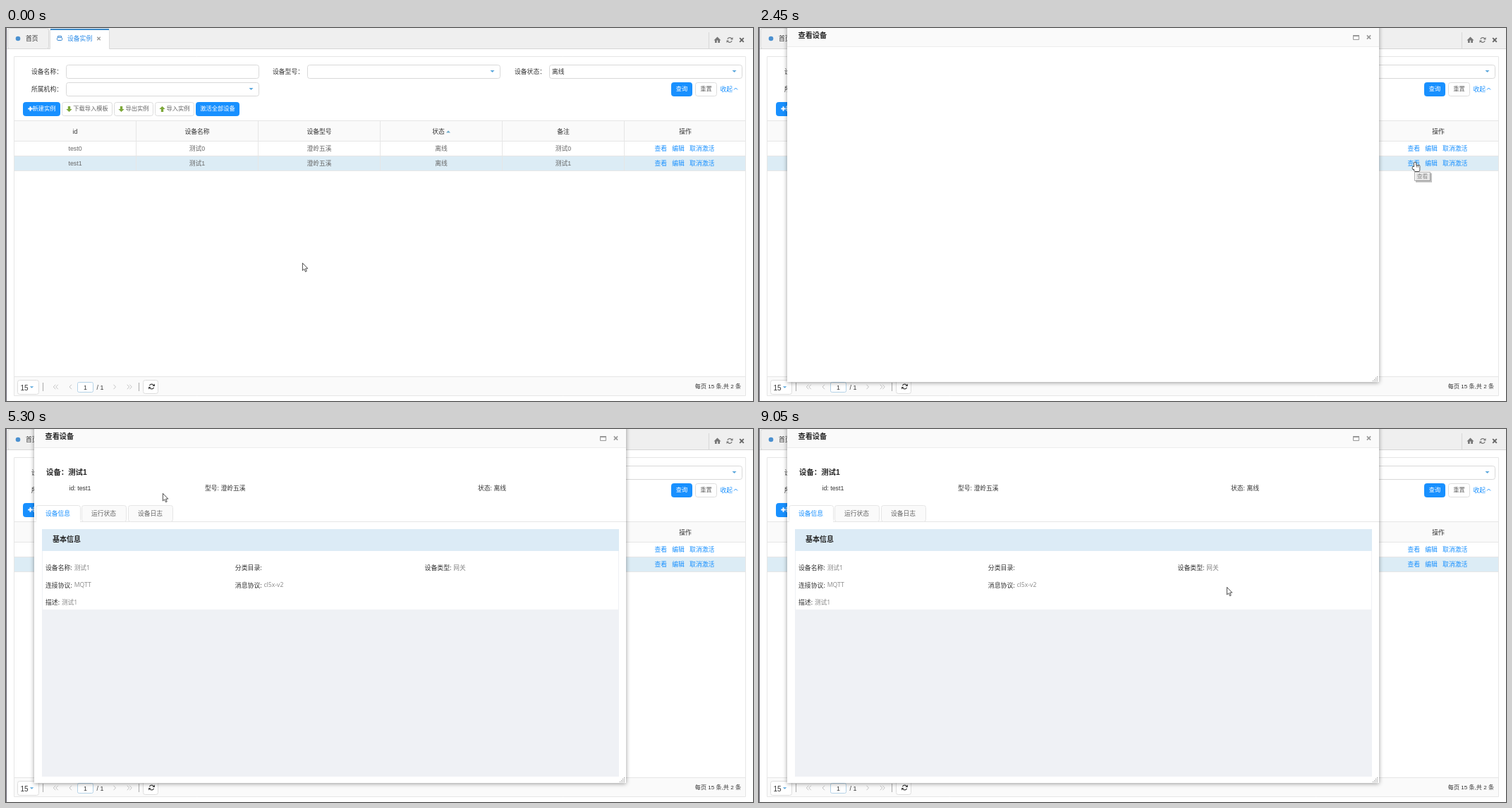
Recreate the animation shown at these times as an HTML page with a canvas. Size 1059 by 529 pixels, loop 9.1 s.

```html
<!DOCTYPE html>
<html lang="zh-CN">
<head>
<meta charset="utf-8">
<title>设备实例</title>
<style>
html, body { margin: 0; width: 100%; height: 100%; overflow: hidden; background: #fff; }
canvas { display: block; width: 1059px; height: 529px; }
</style>
</head>
<body>
<canvas id="stage" width="1059" height="529"></canvas>
<script>
const ctx = document.getElementById('stage').getContext('2d');
const LOOP = 9100, STEP = 50;
const BLUE = '#1890ff', LINE = '#e6e6e6', GREY = '#666', DARK = '#333', CARET = '#5aa7dc';
const UI = '"Liberation Sans", "Noto Sans CJK SC", sans-serif';
const CENTERED_COLON = '"Liberation Sans", "Noto Sans CJK TC", sans-serif';
const VALUE = '"Open Sans", "Noto Sans CJK SC", sans-serif';
const MODEL = '澄岭五溪';

// ---- drawing helpers ----
function text(s, x, y, { color = DARK, size = 8.8, align = 'left', bold = false, family = UI } = {}) {
  ctx.font = `${bold ? 'bold ' : ''}${size}px ${family}`;
  ctx.textAlign = align;
  ctx.fillStyle = color;
  ctx.fillText(s, x, y + size * 0.36);
  return ctx.measureText(s).width;
}
function rect(x, y, w, h, color) {
  ctx.fillStyle = color;
  ctx.fillRect(x, y, w, h);
}
function box(x, y, w, h, fill, border, radius = 3) {
  ctx.beginPath();
  ctx.roundRect(x + 0.5, y + 0.5, w - 1, h - 1, radius);
  if (fill) { ctx.fillStyle = fill; ctx.fill(); }
  if (border) { ctx.strokeStyle = border; ctx.lineWidth = 1; ctx.stroke(); }
}
function trace(points, x, y) {
  ctx.beginPath();
  points.forEach(([px, py]) => ctx.lineTo(x + px, y + py));
}
function shape(points, x, y, fill) {
  trace(points, x, y);
  ctx.fillStyle = fill;
  ctx.fill();
}
function line(points, x, y, color, width = 1) {
  trace(points, x, y);
  ctx.strokeStyle = color;
  ctx.lineWidth = width;
  ctx.stroke();
}
// Triangle pointing down for dir 1, up for dir -1.
function caret(x, y, color = CARET, dir = 1, r = 3) {
  shape([[-r, -r / 2 * dir], [r, -r / 2 * dir], [0, r / 2 * dir]], x, y, color);
}
function cross(x, y, r, color, width) {
  line([[-r, -r], [r, r]], x, y, color, width);
  line([[r, -r], [-r, r]], x, y, color, width);
}
function refresh(x, y, color) {
  for (const dir of [1, -1]) {
    const turn = dir > 0 ? 0 : Math.PI;
    ctx.beginPath();
    ctx.arc(x, y, 3.3, turn + 0.35, turn + 2.7);
    ctx.strokeStyle = color;
    ctx.lineWidth = 1.3;
    ctx.stroke();
    shape([[4.5, -4], [4.5, -0.5], [1, -0.5]].map(p => p.map(v => v * dir)), x, y, color);
  }
}
function chevrons(x, dir, count) {
  for (let i = 0; i < count; i++) {
    const dx = (i - (count - 1) / 2) * 3.5;
    line([[-1.5 * dir, -3.2], [1.5 * dir, 0], [-1.5 * dir, 3.2]], x + dx, 509, '#c4c4c4');
  }
}
function transferArrow(x, y, dir) {
  rect(x - 1.7, y - 2 - 2 * dir, 3.4, 4, '#7da83a');
  caret(x, y + 2 * dir, '#7da83a', dir, 4.2);
}
function plus(x, y) {
  rect(x - 3.2, y - 1, 6.4, 2, '#fff');
  rect(x - 1, y - 3.2, 2, 6.4, '#fff');
}
function button(label, x, y, w, primary, iconSpace = 0) {
  box(x, y, w, 20, primary ? BLUE : '#fff', primary ? BLUE : '#ddd');
  text(label, x + (w + iconSpace) / 2, y + 9.5, { size: 8.25, color: primary ? '#fff' : GREY, align: 'center' });
}

// ---- page ----
function tabBar() {
  rect(0, 0, 1059, 30, '#efefef');
  rect(0, 29, 1059, 1, '#d6d6d6');
  box(2, 0, 59, 30, '#f0f0f0', '#d8d8d8');
  ctx.beginPath();
  ctx.arc(17, 15, 3.3, 0, 7);
  ctx.fillStyle = '#4a90d0';
  ctx.fill();
  text('首页', 28, 15);
  box(62, 1, 85, 32, '#fff', '#ddd');
  rect(62, 30, 85, 4, '#fff');
  rect(63, 1, 83, 2, '#3a87c4');
  box(73, 11, 6, 4, null, '#3a87d0', 0);
  box(72, 13, 8, 5, '#fff', '#3a87d0', 1);
  text('设备实例', 87, 15, { color: '#2a8be8' });
  cross(131.5, 15, 2.2, '#999', 1.3);
  rect(996, 6, 1, 23, '#d8d8d8');
  caret(1008.5, 15, '#777', -1, 5);
  rect(1005, 17, 2.7, 4, '#777');
  rect(1009.3, 17, 2.7, 4, '#777');
  refresh(1026, 17, '#777');
  cross(1043, 17, 2.8, '#666', 1.9);
}
function searchForm() {
  ['设备名称：', '设备型号：', '设备状态：', '所属机构：'].forEach((label, i) => {
    const x = Math.floor(85 + 342.5 * (i % 3)), y = i < 3 ? 52 : 77;
    text(label, x - 49, y + 9.5, { family: CENTERED_COLON });
    box(x, y, 274, 20, '#fff', '#d9d9d9');
    if (i) caret(x + 262.5, y + 9.5);
  });
  text('离线', 774, 61.5);
  button('查询', 943, 77, 30, true);
  button('重置', 977, 77, 31, false);
  text('收起', 1012.5, 86.5, { color: BLUE });
  line([[-2.5, 1.5], [0, -1], [2.5, 1.5]], 1034.5, 86, BLUE);
}
function toolbar() {
  const down = x => transferArrow(x, 115, 1), up = x => transferArrow(x, 115, -1);
  const items = [['新建实例', x => plus(x, 114.5), true], ['下载导入模板', down], ['导出实例', down],
    ['导入实例', up], ['激活全部设备', null, true]];
  let x = 24;
  for (const [label, icon, primary] of items) {
    const iconSpace = !icon ? 0 : primary ? 7 : 10;
    const w = Math.round(label.length * 8.25 + iconSpace + 12.5);
    button(label, x, 105, w, primary, iconSpace);
    if (icon) icon(x + 10.5);
    x += w + 2;
  }
}
function table() {
  const center = column => 98 + 173 * column;
  rect(11, 132, 1038, 29, '#fafafa');
  rect(11, 181, 1038, 21, '#dcecf5');
  for (const y of [131, 160, 181, 202]) rect(11, y, 1038, 1, LINE);
  for (let i = 1; i < 6; i++) rect(11 + 173 * i, 132, 1, 70, LINE);
  ['id', '设备名称', '设备型号', '状态', '备注', '操作'].forEach((s, i) =>
    text(s, center(i) - (s === '状态' ? 4 : 0), 146.5, { align: 'center' }));
  caret(627, 147, '#6aa9c9', -1);
  for (const row of [0, 1]) {
    const y = 171.3 + row * 20.5;
    ['test' + row, '测试' + row, MODEL, '离线', '测试' + row].forEach((s, i) =>
      text(s, center(i), y, { align: 'center', color: GREY }));
    ['查看', '编辑', '取消激活'].forEach((s, i) => text(s, 919.5 + 24.8 * i, y, { color: BLUE }));
  }
}
function pager() {
  rect(11, 494, 1038, 28, '#fafafa');
  rect(11, 494, 1038, 1, LINE);
  box(16, 499, 31, 21, '#fff', '#ddd');
  text('15', 20.5, 510, { size: 10 });
  caret(36.5, 509.5, CARET, 1, 2.7);
  for (const x of [52, 188]) rect(x, 503, 1, 12, '#aaa');
  chevrons(70.5, -1, 2);
  chevrons(91.5, -1, 1);
  box(101, 502, 23, 15, '#fff', '#b5d3e8', 2);
  text('1', 112.5, 509.5, { align: 'center' });
  text('/ 1', 128.5, 509.5);
  chevrons(154, 1, 1);
  chevrons(175, 1, 2);
  box(194, 499, 22, 20, '#fff', '#ddd');
  refresh(206.5, 508.5, '#444');
  text('每页 15 条,共 2 条', 1042, 508, { size: 8.1, align: 'right' });
}
function page() {
  rect(0, 0, 1059, 529, '#fff');
  tabBar();
  searchForm();
  toolbar();
  table();
  pager();
  box(11, 40, 1038, 482, null, LINE, 0);
  rect(0, 0, 1, 529, '#6b6875');
}

// ---- dialog ----
function dialogFrame() {
  ctx.save();
  ctx.shadowColor = 'rgba(0,0,0,.4)';
  ctx.shadowBlur = 6;
  ctx.shadowOffsetY = 1;
  rect(40, -20, 839, 522, '#fff');
  ctx.restore();
  rect(40, 0, 839, 26, '#fafafa');
  rect(40, 26, 839, 1, '#ececec');
  text('查看设备', 55.5, 10.5, { size: 10.2, bold: true, color: '#222' });
  box(842, 10, 9, 7, null, '#999', 0);
  rect(842, 10, 9, 2, '#999');
  cross(864.5, 13, 2.6, '#999', 1.6);
  for (let i = 0; i < 4; i++)
    for (let j = 0; j <= i; j++) rect(876 - j * 2, 494 + i * 2, 1, 1, '#888');
}
function dialogContent(loaded) {
  text('设备：测试1', 57, 61, { size: 10.4, bold: true, color: '#222', family: CENTERED_COLON });
  text('id: test1', 89.5, 84);
  text('型号: ' + MODEL, 282, 84);
  text('状态: 离线', 669, 84);
  rect(40, 131, 839, 1, LINE);
  ['设备信息', '运行状态', '设备日志'].forEach((s, i) => {
    const x = Math.floor(42 + i * 65.5), active = i === 0;
    box(x, 108, 64, 24, active ? '#fff' : '#fafafa', LINE);
    if (active) rect(x + 1, 129, 62, 3, '#fff');
    text(s, x + 31.5, 120, { align: 'center', color: active ? BLUE : GREY });
  });
  rect(51, 142, 818, 351, '#eff1f5');
  rect(51, 142, 818, 31, '#dcebf6');
  rect(52, 173, 816, 83, '#fff');
  text('基本信息', 66, 156.5, { size: 10, bold: true, color: '#222' });
  const rows = [
    [['设备名称:', '测试1'], ['分类目录:', ''], ['设备类型:', '网关']],
    [['连接协议:', 'MQTT'], ['消息协议:', 'cl5x-v2']],
    [['描述:', '测试1']],
  ];
  rows.forEach((row, r) => row.forEach(([label, value], c) => {
    const x = 56 + 268.8 * c, y = 197 + 24.3 * r;
    const w = text(label, x, y, { size: 8.9, family: VALUE });
    if (loaded) text(value, x + w + 2.8, y, { size: 8.7, color: '#888', family: VALUE });
  }));
}

// ---- pointer ----
const REST = [420, 333];
// Each move: start, end, destination x, y; the pointer rests in between.
const MOVES = [
  [150, 1100, 952, 188], [1550, 2050, 930, 190], [3400, 3750, 363, 180], [3900, 4850, 85, 86],
  [5150, 5300, 222, 91], [5300, 6000, 728, 86], [6200, 6650, 145, 147], [6650, 6900, 135, 186],
  [7100, 7600, 66, 164], [7750, 8000, 110, 215], [8100, 8400, 136, 243], [8500, 8700, 325, 233],
  [8800, 9050, 663, 224],
];
const ramp = (t, from, to) => Math.min(1, Math.max(0, (t - from) / (to - from)));
const ease = u => (u + u * u * (3 - 2 * u)) / 2;

function pointerAt(t) {
  let [x, y] = REST;
  for (const [from, to, toX, toY] of MOVES) {
    const u = ease(ramp(t, from, to));
    x += (toX - x) * u;
    y += (toY - y) * u;
  }
  return [Math.round(x), Math.round(y)];
}
function hand(x, y) {
  const finger = [3, 0.5, 2.3, 9], palm = [3, 4.7, 7.5, 8.3], thumb = [0.5, 6.8, 4, 3.5];
  ctx.beginPath();
  for (const [dx, dy, w, h] of [finger, palm, thumb]) ctx.roundRect(x + dx, y + dy, w, h, 1.2);
  ctx.strokeStyle = '#222';
  ctx.lineWidth = 1.5;
  ctx.stroke();
  ctx.fillStyle = '#fff';
  ctx.fill();
  for (const dx of [6, 8]) rect(x + dx, y + 5, 0.7, 2.5, '#222');
}
function arrow(x, y) {
  const outline = [[0, 0], [0, 10.6], [2.4, 8.4], [4.1, 12.3], [5.8, 11.5], [4.2, 7.7], [7.4, 7.7], [0, 0]];
  shape(outline, x + 0.4, y + 0.4, '#fff');
  line(outline, x + 0.4, y + 0.4, '#222', 0.8);
}
function pointer(t) {
  const [x, y] = pointerAt(t);
  const overLink = t >= 1050 && t < 3450;
  if (overLink) hand(x - 4, y);
  else arrow(x, y);
}
function tooltip(label, x, alpha) {
  if (alpha <= 0) return;
  ctx.save();
  ctx.globalAlpha = alpha;
  rect(x + 2, 206, 23, 13, '#999');
  box(x, 204, 23, 13, '#fff', '#777', 0);
  text(label, x + 11.5, 210.5, { size: 7.8, align: 'center', color: '#555' });
  ctx.restore();
}

// ---- timeline ----
function dialog(t) {
  const open = ramp(t, 2300, 2450), scale = 0.5 + 0.5 * open;
  ctx.save();
  ctx.globalAlpha = open;
  ctx.translate(459.5, 241);
  ctx.scale(scale, scale);
  ctx.translate(-459.5, -241);
  dialogFrame();
  if (t >= 2900) dialogContent(t >= 3150);
  ctx.restore();
}
function statusBar(t) {
  ctx.globalAlpha = 1 - ramp(t, 3600, 4000);
  box(-3, 518, 262, 20, '#fff', '#ddd', 2);
  ctx.globalAlpha = 1;
}
function draw(t) {
  page();
  if (t >= 2350) dialog(t);
  if (t >= 2900) statusBar(t);
  if (t < 1700) tooltip('编辑', 950, ramp(t, 1400, 1500));
  else tooltip('查看', 929, ramp(t, 2250, 2350) * (1 - ramp(t, 2350, 2600)));
  pointer(t);
}

const start = performance.now();
function tick() {
  const t = (performance.now() - start) % LOOP;
  draw(Math.floor(t / STEP) * STEP);
  requestAnimationFrame(tick);
}
tick();
</script>
</body>
</html>
```
